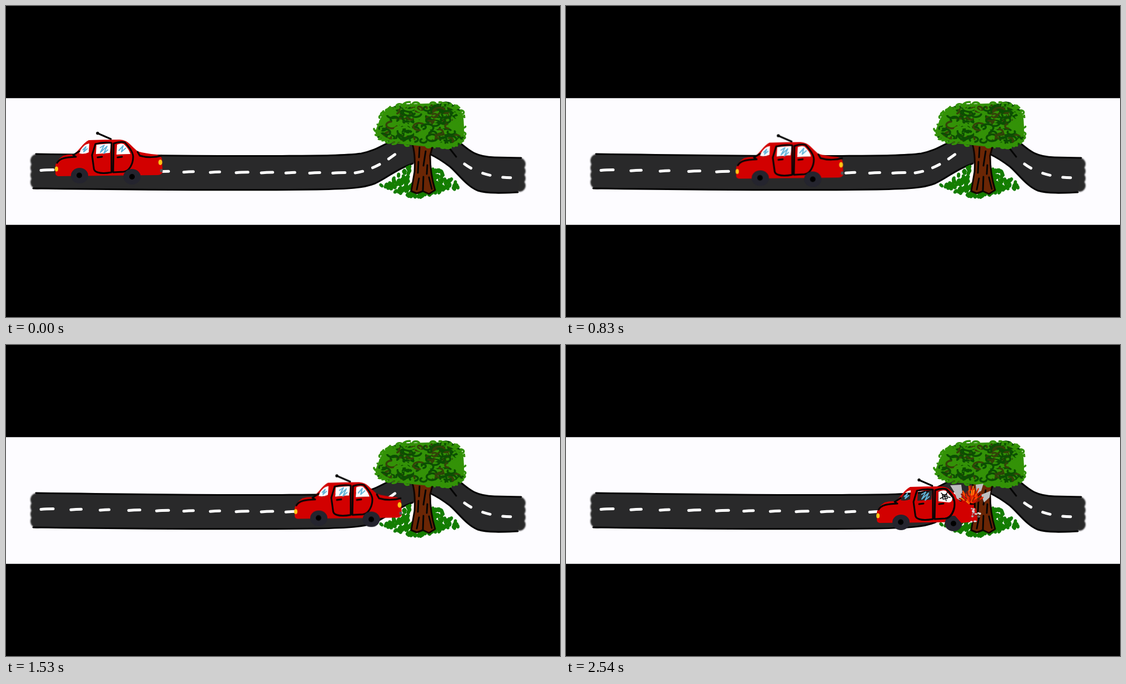
Animation, 998 px wide and 561 px high, one loop 2580 ms. Source, as an HTML page:

```html
<!DOCTYPE html>
<html lang="en">
<head>
<meta charset="utf-8">
<title>Car and tree</title>
<style>
  html, body { margin: 0; width: 100%; height: 100%; overflow: hidden; background: #000; }
  svg { display: block; width: 998px; height: 561px; }
  .ink { fill: none; stroke: #050505; stroke-width: 3; stroke-linecap: round; stroke-linejoin: round; }
  .lane { fill: none; stroke: #fff; stroke-width: 5; stroke-linecap: round; }
  .scribble path { fill: none; stroke-linecap: round; }
  #blue { fill: none; stroke: #62b4d8; stroke-width: 2; stroke-linejoin: round; }
</style>
</head>
<body>
<svg viewBox="0 0 998 561">
  <defs>
    <filter id="soft"><feGaussianBlur stdDeviation="1.2"/></filter>
    <path id="panes" d="M132 266C135 256 142 249 150 248L149 264Q141 268 132 266Z
      M163 250L189 248L187 265L162 267Z
      M200 250Q207 247 212 249Q221 257 224 267L199 268Z"/>
    <g id="body">
      <path fill="#d20000" fill-rule="evenodd" d="M89 302L89 287Q92 277 103 270Q113 267 122 268
        C130 262 139 247 149 242Q177 241 205 241Q216 242 222 248Q230 256 237 262Q250 266 272 268Q280 270 281 276
        L282 300Q280 305 272 305L94 307Q89 306 89 302Z
        M132 266C135 256 142 249 150 248L149 264Q141 268 132 266Z
        M163 250L189 248L187 265L162 267Z
        M200 250Q207 247 212 249Q221 257 224 267L199 268Z"/>
      <path id="blue" d="M138 260L144 254L140 263L147 257M169 256L177 251L170 264L182 253L176 266L184 259M203 261L211 252L208 263L216 256"/>
      <path class="ink" d="M92 283C97 274 108 273 126 272L121 269L132 262
        M237 263L241 270C254 274 270 273 280 270
        M161 249Q176 245 190 247L190 300Q174 303 165 300Q158 298 158 291L155 269Z
        M194 248Q205 244 214 246Q229 262 229 272C229 285 222 298 212 299L193 300Z
        M165 273L173 272M201 273L209 272M189 240L166 230"/>
      <circle cx="165" cy="229.500" r="2.700"/>
      <ellipse cx="91" cy="294" rx="3" ry="4.500" fill="#ffc414"/>
      <ellipse cx="278" cy="282" rx="3.500" ry="5" fill="#ffc414"/>
      <ellipse cx="280" cy="297" rx="2.500" ry="3" fill="#555"/>
      <g fill="#24242e">
        <ellipse cx="132.500" cy="306" rx="15.500" ry="14"/>
        <ellipse cx="227" cy="308" rx="15.500" ry="14"/>
      </g>
      <circle cx="132" cy="305.500" r="5"/>
      <circle cx="227" cy="308" r="5"/>
    </g>
  </defs>

  <rect width="998" height="561"/>
  <rect y="166.250" width="998" height="228.500" fill="#fdfcff"/>

  <g fill="#29292a">
    <g id="ends" filter="url(#soft)"></g>
    <path d="M54 267C200 269 350 271 480 270.500C560 270 610 270 640 266C664 261 675 253 690 246
      C720 232 790 228 818 247C837 263 848 272 880 273L928 274L922 336C900 337 870 339 850 333
      C830 325 815 303 800 290Q780 275 765 268L733 284C700 296 690 308 665 320
      C645 328 620 330 560 331C400 333 200 331 49 329Z"/>
  </g>
  <path class="ink" d="M54 267C200 269 350 271 480 270.500C560 270 610 270 640 266C664 261 675 253 690 246
    M818 247C837 263 848 272 880 273L928 274
    M49 329C200 331 400 333 560 331C620 330 645 328 665 320C690 308 700 296 733 284
    M765 268Q780 275 800 290C815 303 830 325 850 333C870 339 900 337 922 336M800 258L811 272"/>
  <g id="lane" class="lane">
    <path stroke-dasharray="14 19" d="M629 301Q665 296 707 263"/>
    <path stroke-dasharray="14 23" d="M826 285Q858 309 914 310"/>
  </g>
  <g id="grass" fill="#147d00"></g>

  <use id="ghost" href="#car" opacity="0"/>
  <g id="mover"><g id="car"><use id="glass" href="#panes" fill="#fff"/><use href="#body"/></g></g>

  <path fill="#6b2605" stroke="#100500" stroke-width="3" stroke-linejoin="round"
    d="M731 246Q738 265 736 299L730 334L740 338L751 334L762 339L773 332Q764 302 764 270L770 247Z"/>
  <path class="ink" d="M745 255L744 273M756 262L752 288M743 281L742 301M759 287L758 303M744 311L740 331M752 308L751 333M762 309L767 330"/>
  <g id="leaves" class="scribble"></g>

  <g id="crash" opacity="0">
    <path fill="#d20000" d="M698 279L724 285L739 296L741 318L712 321L699 306Z"/>
    <path fill="#fff" d="M671 265Q678 261 684 263L696 276Q696 283 690 284L671 282Z"/>
    <path class="ink" style="stroke-width:1.500" d="M682 273L676 267M682 273L687 266M682 273L692 275M682 273L685 281M682 273L674 277M678 270L686 270L687 277L679 278Z"/>
    <path class="ink" d="M686 261Q701 274 700 288C700 300 693 312 684 313"/>
    <path fill="#bdbdbf" d="M692 253L712 252L714 266L711 281L704 277L700 266Z
      M738 252L752 250L748 263L740 269ZM748 270L765 263L763 275L753 284Z"/>
    <g id="fire" class="scribble"></g>
    <g id="debris"></g>
  </g>
</svg>

<script>
const LOOP = 2580, HOLD = 367;
const { sin, cos, abs, sign, sqrt, floor, PI } = Math;
const $ = id => document.getElementById(id);

let seed = 7;
const rnd = (a = 0, b = 1) => {
  seed = (seed * 16807) % 2147483647;
  return a + (b - a) * seed / 2147483647;
};
const pick = list => list[floor(rnd(0, list.length))];

function add(parent, tag, attrs) {
  const el = document.createElementNS('http://www.w3.org/2000/svg', tag);
  for (const key in attrs) el.setAttribute(key, attrs[key]);
  $(parent).append(el);
}

// Lumpy road ends
for (let i = 0; i < 4; i++) {
  add('ends', 'circle', { cx: 56, cy: 279 + i * 13, r: 12 });
  add('ends', 'circle', { cx: 925, cy: 285 + i * 13, r: 11 });
}

// Lane marks on the straight draw closer together to the right
for (let i = 0; i < 12; i++) {
  const x = 63 + 54.5 * i - 0.61 * i * i;
  const y = 296.5 + 5 * sin(i / 7);
  add('lane', 'path', { d: `M${x} ${y}q9 -1 ${19 + 3 * cos(i * 1.7)} -1` });
}

// Grass tufts fill a triangle on each side of the trunk
function tufts(a, b, c, count) {
  for (let i = 0; i < count; i++) {
    const u = sqrt(rnd()), v = rnd();
    const mix = k => a[k] * (1 - u) + b[k] * u * (1 - v) + c[k] * u * v;
    const x = mix(0), y = mix(1);
    add('grass', 'ellipse', {
      cx: x, cy: y, rx: rnd(2.8, 3.8), ry: rnd(3.8, 5.2),
      transform: `rotate(${rnd(-50, 50)} ${x} ${y})`
    });
  }
}
tufts([727, 290], [674, 325], [738, 347], 75);
tufts([773, 290], [820, 327], [738, 346], 105);

// Foliage: a rounded box, narrower on top, lower on the right
function crown(angle, scale) {
  const round = v => sign(v) * abs(v) ** 0.55 * scale;
  const u = round(cos(angle)), v = round(sin(angle));
  const x = 748 + 77 * u * (1 + 0.1 * v) - 6 * v;
  return [x, 214 + 38 * v + 5 * u * v + 3 * u];
}
function curl(x, y, r, color, width) {
  const a = rnd(0, 2 * PI), b = a + rnd(2.5, 5);
  const at = t => `${x + r * 1.3 * cos(t)} ${y + r * 0.8 * sin(t)}`;
  add('leaves', 'path', {
    d: `M${at(a)}A${r * 1.3} ${r * 0.8} 0 ${b - a > PI ? 1 : 0} 1 ${at(b)}`,
    stroke: color, 'stroke-width': width
  });
}
const edge = Array.from({ length: 60 }, (_, i) => crown(i * PI / 30, 1));
add('leaves', 'path', { d: `M${edge.join('L')}Z`, style: 'fill:#339207' });
for (let i = 0; i < 150; i++) {
  const [x, y] = crown(rnd(0, 2 * PI), sqrt(rnd(0, 0.85)));
  curl(x, y, rnd(4, 9), pick(['#0c4e03', '#0c4e03', '#0c4e03', '#35420a', '#339207']), 3.5);
}
for (let i = 0; i < 46; i++) {
  const [x, y] = crown(i * PI / 23, 0.97);
  curl(x, y, rnd(3, 5), '#339207', 3.5);
}

// Flames and scattered debris
for (let i = 0; i < 75; i++) {
  const angle = rnd(-2.9, -0.25), r = rnd(4, 27);
  const x = 729 + cos(angle) * r * 0.72, y = 288 + sin(angle) * r;
  add('fire', 'path', {
    d: `M${x} ${y}l${cos(angle) * 5} ${sin(angle) * 8}`,
    stroke: pick(['#e82800', '#ff4a00', '#ff7a0b', '#d41200', '#8f1808']), 'stroke-width': 2.3
  });
}
for (let i = 0; i < 14; i++) {
  add('debris', 'ellipse', {
    cx: rnd(729, 746), cy: rnd(295, 319), rx: rnd(1, 3), ry: rnd(1, 2.2),
    fill: pick(['#ddd', '#aaa', '#555'])
  });
}

// The car jumps from stop to stop; the second shows a faint preview of the fifth
const stops = [[0, 0], [126, -1.7], [217.5, 4.5], [373, 3], [431, 6.5], [458.5, 13.5], [471, 14]];
const PREVIEW = 1, NEAR = 4, IMPACT = 6;
$('ghost').setAttribute('transform', `translate(${stops[NEAR]})`);

function play(id, style) {
  const frames = stops.map((stop, i) => ({
    offset: i * HOLD / LOOP, easing: 'steps(1, end)', ...style(i, stop)
  }));
  frames.push({ ...frames[IMPACT], offset: 1 });
  $(id).animate(frames, { duration: LOOP, iterations: Infinity }).startTime = 0;
}
play('mover', (i, [x, y]) => ({
  transform: `translate(${x}px, ${y}px)`, opacity: i === PREVIEW ? 0.82 : 1
}));
play('ghost', i => ({ opacity: i === PREVIEW ? 0.34 : 0 }));
play('glass', i => ({ opacity: i > NEAR ? 0 : 1 }));
play('crash', i => ({ opacity: i === IMPACT ? 1 : 0 }));
</script>
</body>
</html>
```
